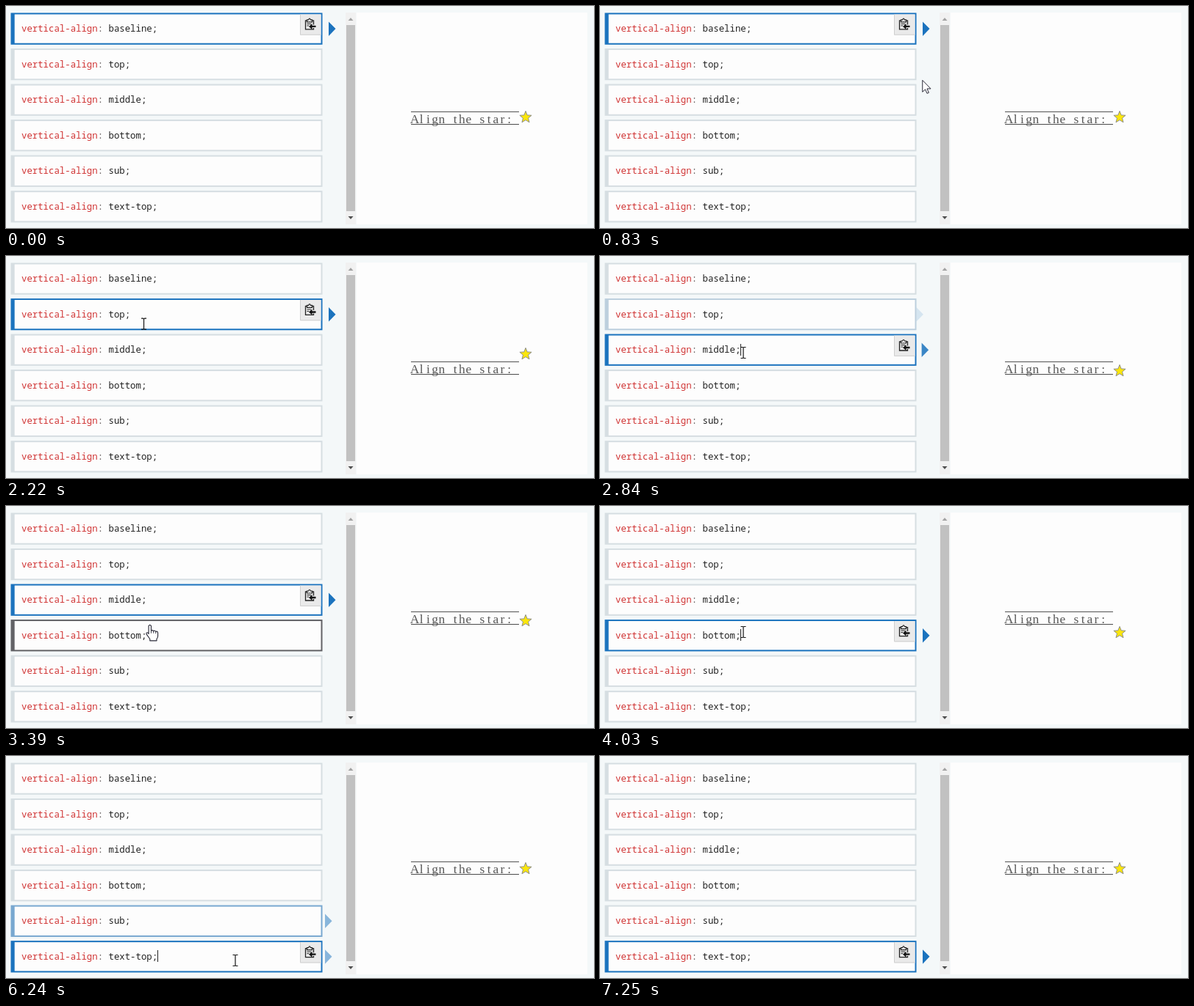
These frames come from a looping animation (800 by 303 pixels, 7320 ms). An HTML page:

```html
<!DOCTYPE html>
<html lang="en">
<head>
<meta charset="utf-8">
<title>vertical-align demo</title>
<style>
  html, body { margin: 0; width: 100%; height: 100%; overflow: hidden; background: #f4f8f9; }
  svg { display: block; }
  .code { font: 12.35px "Noto Sans Mono", monospace; fill: #222; white-space: pre; }
  .prop { fill: #d03434; }
  .colon { fill: #5c5555; }
  .sample { font: 17.5px "Liberation Serif", serif; fill: #585858; text-anchor: middle; }
</style>
</head>
<body>
<svg id="stage" width="800" height="303" viewBox="0 0 800 303">
  <rect width="800" height="303" fill="#f4f8f9"/>
  <g id="rows"></g>

  <g id="button">
    <rect x="400" y="2" width="28.5" height="28.3" fill="#eaeaea"/>
    <path d="M400.5 2V29.8H428.5" fill="none" stroke="#cfcfcf"/>
    <path d="M418.5 16V10.5H407.5V22.5H418.5V20.5" fill="none" stroke="#222" stroke-width="1.3"/>
    <path d="M409.5 12.5V9.5H411.5Q413 6 414.5 9.5H416.5V12.5Z" fill="#eaeaea" stroke="#222" stroke-width="1.2"/>
    <path d="M409.5 15H415M409.5 17.5H412" stroke="#222"/>
    <path d="M412 18.5L416.5 14.5V17.3H421.5V19.7H416.5V22.5Z" fill="#111"/>
  </g>

  <rect x="462" y="9" width="14" height="289" fill="#f1f1f1"/>
  <rect x="463" y="26" width="12" height="254" fill="#c1c1c1"/>
  <path d="M465.5 20L469 16L472.5 20Z" fill="#a3a3a3"/>
  <path d="M465.5 287L469 291L472.5 287Z" fill="#505050"/>

  <rect x="477" y="9" width="314" height="289" fill="#fdfdfd"/>
  <path d="M551 144.4H698M551 161.5H698" stroke="#4a4a4a"/>
  <text id="sample" class="sample" y="160">Align the star:</text>
  <path id="star" fill="#fbe60c" stroke="#8f8f86" stroke-width="1" stroke-linejoin="round"/>

  <rect id="caret" width="1" height="16" fill="#222"/>
  <g id="hand">
    <path transform="scale(.94)" d="M-1.8 1.5Q0 -1.2 1.8 1.5V8.5Q3.8 7 5.2 9Q7.2 7.6 8.5 9.8Q11 8.8 11.5 11.5V16.5Q11.3 19 9.8 20.5V23H0V20.5L-5 13.5Q-5.6 10.6 -3.2 11.4L-1.8 13Z"
      fill="#fff" stroke="#2a2a38" stroke-width="1.2" stroke-linejoin="round"/>
    <path d="M1.7 8V11.5M4.9 8.5V11.5M8 9.4V12" stroke="#2a2a38" stroke-width=".9"/>
  </g>
  <path id="beam" d="M-3.5 -7.5H-1L0 -6.7L1 -7.5H3.5M0 -6.7V6.7M-3.5 7.5H-1L0 6.7L1 7.5H3.5" fill="none" stroke="#151515" stroke-width="1.2"/>
  <path id="arrow" d="M0 0V16L3.8 12.5L6.2 18L8.6 17L6.2 11.6H11.3Z" fill="#fff" stroke="#2a2a38" stroke-linejoin="round"/>
</svg>
<script>
const LOOP = 7320, FADE = 200, LEAD = 65, STEP = 70, BLINK = 530;
const BLUE = [27, 115, 190], IDLE = [214, 222, 226], HOVER = [98, 98, 102];
const CHAR = 7.41, ROW_H = 43.3;

const values = ["baseline", "top", "middle", "bottom", "sub", "text-top"];
const clicks = [-1000, 1670, 2770, 3860, 4840, 6240];
const starY = [151, 133, 156, 172, 155, 153];

// pointer path: time, x, y
const path = [
  [70, 732, 122], [440, 480, 106], [670, 480, 106], [1360, 181, 72],
  [1440, 182, 71], [1520, 184, 74], [1990, 184, 74], [2600, 195, 132],
  [2980, 195, 132], [3560, 196, 170], [3710, 195, 172], [4130, 195, 172],
  [4670, 212, 222], [5000, 212, 222], [5550, 268, 250], [6010, 312, 279],
  [6700, 312, 279], [6780, 314, 312]
];

const $ = id => document.getElementById(id);
const rowY = i => 9.4 + 48.55 * i;
const clamp = v => Math.max(0, Math.min(1, v));
const easeOut = v => 1 - Math.pow(1 - clamp(v), 1.75);
const smooth = v => v * v * (3 - 2 * v);
const rgb = c => `rgb(${c.map(Math.round)})`;
const mix = (a, b, p) => a.map((v, i) => v + (b[i] - v) * p);
const move = (el, x, y) => el.setAttribute("transform", `translate(${x.toFixed(2)} ${y.toFixed(2)})`);
const show = (el, on) => el.setAttribute("visibility", on ? "visible" : "hidden");

function add(parent, tag, attrs, text) {
  const el = document.createElementNS("http://www.w3.org/2000/svg", tag);
  for (const k in attrs) el.setAttribute(k, attrs[k]);
  if (text) el.textContent = text;
  return parent.appendChild(el);
}

const rows = values.map((value, i) => {
  const g = add($("rows"), "g", { transform: `translate(0 ${rowY(i)})` });
  const tip = add(g, "path", { d: "M0 12L9.5 21.7L0 31.5Z", fill: rgb(BLUE) });
  const frame = add(g, "rect", { x: 6.5, y: 0, width: 424, height: ROW_H });
  add(g, "rect", { x: 11.7, y: 2, width: 416.8, height: ROW_H - 4, fill: "#fdfdfd" });
  const text = add(g, "text", { class: "code", x: 21, y: 25.9 });
  add(text, "tspan", { class: "prop" }, "vertical-align");
  add(text, "tspan", { class: "colon" }, ":");
  add(text, "tspan", {}, ` ${value};`);
  return { tip, frame };
});

$("sample").setAttribute("x", [..."Align the star:"].map((c, i) => (556 + 9.19 * i).toFixed(1)).join(" "));

$("star").setAttribute("d", "M" + Array.from({ length: 10 }, (_, i) => {
  const r = i % 2 ? 3.7 : 8.5, a = Math.PI * (i / 5 - 0.5);
  return `${(r * Math.cos(a)).toFixed(2)} ${(r * Math.sin(a) + 0.9).toFixed(2)}`;
}).join("L") + "Z");

function pointerAt(t) {
  const n = path.findIndex(k => k[0] > t);
  if (n < 1) return null;
  const [t0, x0, y0] = path[n - 1], [t1, x1, y1] = path[n];
  const p = smooth((t - t0) / (t1 - t0));
  return { x: x0 + (x1 - x0) * p, y: y0 + (y1 - y0) * p };
}

function drawPointer(t, active) {
  const at = pointerAt(t);
  const over = at && at.x >= 7 && at.x < 430
    ? values.findIndex((v, i) => at.y >= rowY(i) && at.y < rowY(i) + ROW_H) : -1;
  const kind = !at ? "" : over < 0 ? "arrow" : over === active ? "beam" : "hand";
  for (const id of ["arrow", "beam", "hand"]) {
    show($(id), id === kind);
    if (id === kind) move($(id), at.x, at.y);
  }
  return over;
}

function draw(t) {
  const active = clicks.findLastIndex(c => c <= t);
  const since = t - clicks[active];
  const p = easeOut((Math.floor(since / STEP) * STEP + LEAD) / FADE);
  const over = drawPointer(t, active);

  rows.forEach(({ tip, frame }, i) => {
    const level = i === active ? p : i === active - 1 ? 1 - p : 0;
    const color = i === active ? BLUE : i === over ? HOVER : mix(IDLE, BLUE, level);
    frame.setAttribute("fill", rgb(color));
    tip.setAttribute("opacity", level);
    move(tip, 429 + 10 * level, 0);
  });

  move($("button"), 0, rowY(active));
  move($("star"), 707, starY[active]);
  show($("caret"), active > 0 && Math.floor(since / BLINK) % 2 === 0);
  move($("caret"), Math.round(21 + CHAR * (17 + values[active].length)), Math.round(rowY(active) + 13));
}

function tick(now) {
  draw(now % LOOP);
  requestAnimationFrame(tick);
}
draw(0);
requestAnimationFrame(tick);
</script>
</body>
</html>
```
